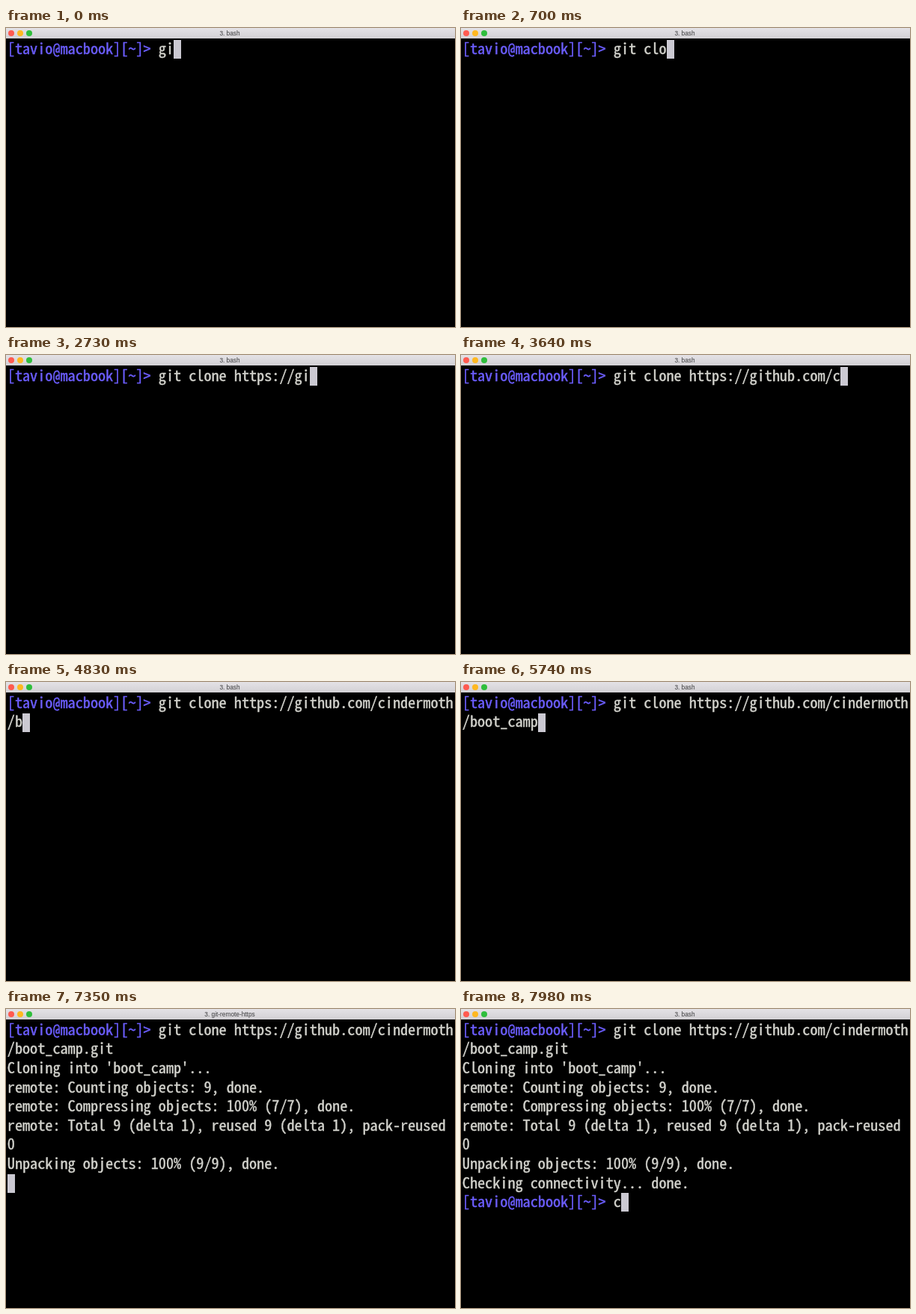
An HTML page with a canvas for the animation above (8 s loop, 600x400 px).

```html
<!DOCTYPE html>
<html lang="en">
<head>
<meta charset="utf-8">
<title>Terminal</title>
<style>
  html, body { margin: 0; width: 100%; height: 100%; overflow: hidden; background: #000; }
  canvas { display: block; }
</style>
</head>
<body>
<canvas id="stage" width="600" height="400"></canvas>
<script>
const ctx = document.getElementById('stage').getContext('2d');
const LOOP = 8000, TICK = 70;
const COLS = 59, CELL = 10.1, ROW = 25.6, LEFT = 1.8, TOP = 16, BASE = 34.8;
const INK = '#d2d2cc', PURPLE = '#6c5eff', BLOCK = '#cbc9d2';
const MONO = '"Noto Sans Mono CJK JP", "Noto Sans Mono CJK SC", "DejaVu Sans Mono", monospace';

const PROMPT = '[tavio@macbook][~]> ';
const COMMAND = 'git clone https://github.com/cindermoth/boot_camp.git';

// [time, characters typed]
const TYPING = [
  [0, 2], [1400, 13], [1610, 15], [1820, 16], [2240, 17], [2450, 18], [2660, 19], [2730, 20],
  [3080, 25], [3150, 27], [3290, 28], [3500, 29], [3640, 30], [4830, 41], [6090, 53]
];

// [time, text, color]
const OUTPUT = [
  [6160, '\n'],
  [6230, "Cloning into 'boot_camp'...\n"],
  [7000, 'remote: Counting objects: 9, done.\n'],
  [7070, 'remote: Compressing objects: 100% (7/7), done.\n'],
  [7140, 'remote: Total 9 (delta 1), reused 9 (delta 1), pack-reused 0\n'],
  [7210, 'Unpacking objects: 100% (9/9), done.\n'],
  [7420, 'Checking connectivity... done.\n'],
  [7560, PROMPT, PURPLE],
  [7910, 'c']
];

// Size the font so that one character fills one cell.
ctx.font = '100px ' + MONO;
const size = 100 * CELL / ctx.measureText('0').width;

let col, row;

// A thin outline gives the text its medium weight.
function put(text, color = INK) {
  ctx.font = size + 'px ' + MONO;
  ctx.fillStyle = ctx.strokeStyle = color;
  ctx.lineWidth = 0.45;
  for (const ch of text) {
    if (ch === '\n') { col = 0; row++; continue; }
    const x = LEFT + col * CELL, y = BASE + row * ROW;
    ctx.fillText(ch, x, y);
    ctx.strokeText(ch, x, y);
    if (++col === COLS) { col = 0; row++; }
  }
}

function typed(t) {
  const i = TYPING.findIndex(p => p[0] > t);
  if (i < 0) return COMMAND.length;
  const [t0, n0] = TYPING[i - 1], [t1, n1] = TYPING[i];
  return Math.floor(n0 + (n1 - n0) * (t - t0) / (t1 - t0) + 1e-6);
}

function titleBar(title) {
  const shade = ctx.createLinearGradient(0, 0, 0, 14);
  shade.addColorStop(0, '#e4e2e6');
  shade.addColorStop(1, '#d2d0d4');
  ctx.fillStyle = shade;
  ctx.fillRect(0, 0, 600, 14);
  ['#ff5a50', '#ffb820', '#2fbe3c'].forEach((color, i) => {
    ctx.fillStyle = color;
    ctx.beginPath();
    ctx.arc(7 + 12 * i, 7, 4, 0, 2 * Math.PI);
    ctx.fill();
  });
  ctx.font = '8.3px "Liberation Sans", sans-serif';
  ctx.fillStyle = '#3c3c3e';
  ctx.textAlign = 'center';
  ctx.fillText('3. ' + title, 299, 10.3);
  ctx.textAlign = 'left';
}

function draw(now) {
  const t = Math.floor(now % LOOP / TICK + 1e-6) * TICK;
  ctx.fillStyle = '#000';
  ctx.fillRect(0, 0, 600, 400);
  titleBar(t >= 6230 && t < 7560 ? 'git-remote-https' : 'bash');

  col = row = 0;
  put(PROMPT, PURPLE);
  put(COMMAND.slice(0, typed(t)));
  for (const [at, text, color] of OUTPUT) if (t >= at) put(text, color);

  ctx.fillStyle = BLOCK;
  ctx.fillRect(Math.round(LEFT + col * CELL), Math.round(TOP + row * ROW), 10, 25);
}

function frame() {
  draw(performance.now());
  requestAnimationFrame(frame);
}
frame();
</script>
</body>
</html>
```
